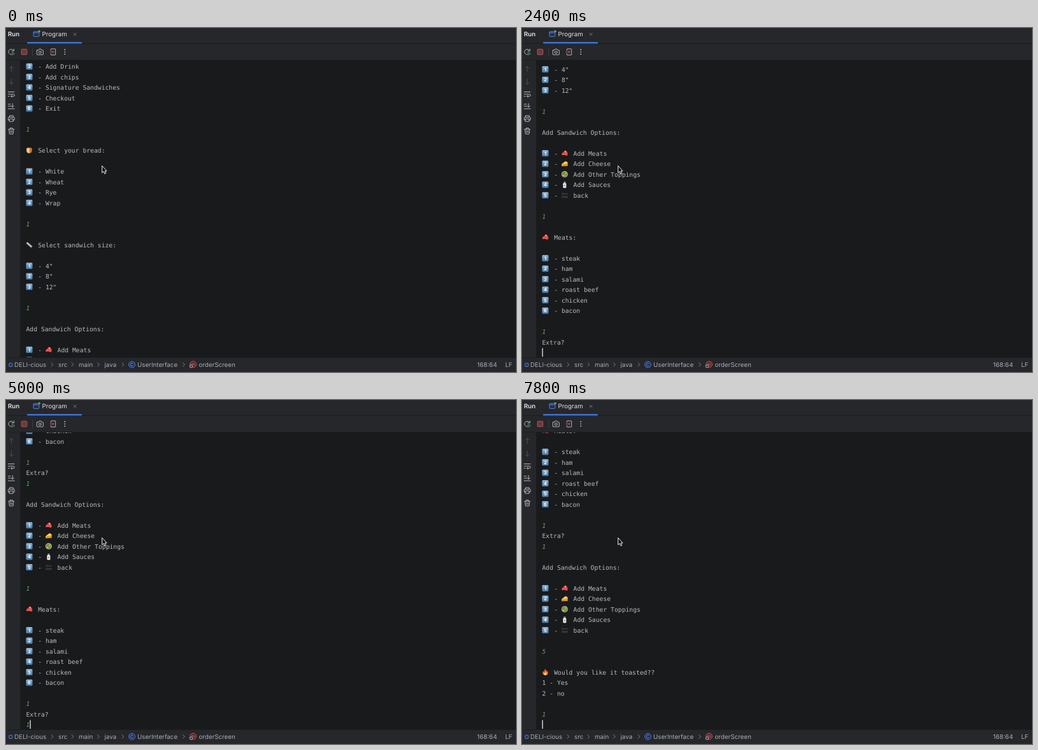
An HTML page that plays this animation: 800 by 541 pixels, repeating every 8 s.

```html
<!DOCTYPE html>
<html lang="en">
<head>
<meta charset="utf-8">
<title>Run console</title>
<style>
  html, body { margin: 0; width: 100%; height: 100%; overflow: hidden; background: #191a1c; }
  svg { display: block; }
  text { white-space: pre; text-rendering: geometricPrecision; }
  .ui { font: 9.75px Inter, sans-serif; fill: #a9acb3; }
  .mono { font: 9.72px "DejaVu Sans Mono", monospace; fill: #b9bbc0; }
  .input { font-style: italic; fill: #55a95b; }
  .digit { font: 700 7.5px Inter, sans-serif; fill: #fff; text-anchor: middle; }
  .line { fill: none; stroke: #c6c8ce; stroke-width: .9; stroke-linecap: round; stroke-linejoin: round; }
  .dim { stroke: #53565b; }
</style>
</head>
<body>
<svg width="800" height="541" viewBox="0 0 800 541">
  <defs>
    <clipPath id="console"><rect x="23" y="51" width="777" height="467"/></clipPath>
    <linearGradient id="blue" x2="0" y2="1">
      <stop stop-color="#8fb6d6"/><stop offset="1" stop-color="#4179a8"/>
    </linearGradient>
    <linearGradient id="flame" x2="0" y2="1">
      <stop stop-color="#e2472c"/><stop offset="1" stop-color="#f59a32"/>
    </linearGradient>
    <rect id="keycap" x="-5" y="-5" width="10" height="10" rx="1.6" fill="url(#blue)"/>
    <g id="bread">
      <path d="M-4.5-2.5Q-4-4.8-1-4.5L3-4Q5-3.5 4.3-1.2L3.8 3 0 4.7-3.7 3Z" fill="#c87d32"/>
      <path d="M-4.5-2.5Q-2-4.5.6-2.4L0 4.7-3.7 3Z" fill="#f2c987"/>
    </g>
    <g id="ruler">
      <path d="M-5-2.6-2.7-4.6 5 2.4 2.8 4.6Z" fill="#b9c0c5"/>
      <path d="M-2-3.6-3-2.6M0-1.8-1-.8M2 0 1 1M4 1.8 3 2.8" stroke="#747b80" stroke-width=".6"/>
    </g>
    <g id="meat">
      <path d="M-4.7 1Q-4-1-1.5-2.5 0-5 2-4.2 5-2 5 1 5 4.4 2.5 3.8-1 2-3.5 3.2-5.5 3-4.7 1Z" fill="#d93a36"/>
      <path d="M-3.8 1.4Q-1 0 2.8 2.4M0-2Q2.4-1.4 3.6 1" fill="none" stroke="#f0a09a" stroke-width=".8"/>
      <circle cx="1.3" cy="-2.6" r=".9" fill="#f5d5c8"/>
    </g>
    <g id="cheese">
      <path d="M-5 1 1-3.8Q4-4 4.8-.5V3.5L-4.6 4Z" fill="#e9a326"/>
      <path d="M-5 1 1-3.8Q4-4 4.8-.5Z" fill="#fbcf55"/>
      <circle cx="-1.5" cy="2.3" r=".9" fill="#c47d18"/><circle cx="2.6" cy="1.6" r=".8" fill="#c47d18"/>
    </g>
    <g id="salad">
      <circle r="5" fill="#c3c7b4"/><circle r="4.2" fill="#4f9a3c"/>
      <circle cx="-1.6" cy="-1.4" r="1.5" fill="#e0543a"/><circle cx="1.8" cy="1.4" r="1.4" fill="#e8733b"/>
      <circle cx="1.6" cy="-1.8" r="1.2" fill="#a4d463"/><circle cx="-1.5" cy="1.8" r="1.1" fill="#d9e0a0"/>
    </g>
    <g id="bottle">
      <path d="M-1.5-4.8H1.5V-2.4H-1.5Z" fill="#9fa3a7"/>
      <rect x="-2.5" y="-2.5" width="5" height="7.5" rx="1.2" fill="#eceded"/>
      <path d="M-.9 0H.9V2.5H-.9Z" fill="#8b8f94"/>
    </g>
    <g id="back" fill="#3b3d41">
      <path d="M-5-2.2-2.5-4.4V-3H5V-1.4H-2.5V0Z"/>
      <path d="M-4.5 1H-2.6V4.2H-4.5ZM-2 1H-.2V4.2H-2ZM.4 1H2.2V4.2H.4ZM2.8 1H4.7V4.2H2.8Z"/>
    </g>
    <g id="fire">
      <path d="M-.8-5Q2.2-3.5 2.3-1 3-1.6 3-2.6 5 .2 4 2.8 2.8 5 0 5-3 5-4 2.6-4.7 0-2.8-2-2.6-.6-1.8-.4-1-2.5-.8-5Z" fill="url(#flame)"/>
      <path d="M.2-.3Q2.4 1.8 1.8 3.4 1 4.8-.2 4.6-2 4.3-1.8 2.5-.2 2 .2-.3Z" fill="#fcd661"/>
    </g>
    <path id="chevron" class="line" d="M-1.5-2.8 1.4 0-1.5 2.8" style="stroke:#858890"/>
  </defs>

  <rect width="800" height="541" fill="#191a1c"/>
  <g clip-path="url(#console)">
    <g id="log"></g>
    <rect id="caret" width="1.5" height="13.5" fill="#ced0d6"/>
  </g>

  <!-- panels -->
  <path d="M0 0H800V51H0ZM0 51H22.5V518H0ZM0 518H800V541H0Z" fill="#25272a"/>
  <path d="M0 24.5H800M0 50.5H800M22.5 51V518M0 518.5H800" stroke="#1b1c1e" fill="none"/>

  <!-- tab strip -->
  <text class="ui" x="3" y="13" style="font-weight:600;fill:#e3e5e9">Run</text>
  <text class="ui" x="56.5" y="13" style="fill:#dfe1e5">Program</text>
  <rect x="33" y="22" width="86" height="2.4" rx="1" fill="#3574f0"/>
  <rect x="43" y="5.5" width="9" height="8" rx="1.3" fill="#25324d" stroke="#548af7" stroke-width=".9"/>
  <path d="M43 7.5H52" stroke="#548af7" stroke-width=".9"/>
  <circle cx="52" cy="5.3" r="2.1" fill="#58b25f" stroke="#25272a" stroke-width=".6"/>
  <path class="line" d="M106 7.8 110.2 12M110.2 7.8 106 12" style="stroke:#74777d"/>

  <!-- toolbar -->
  <path class="line" d="M11.6 35.3A4.2 4.2 0 1 0 8 41.8M12.4 33V36H9.3"/>
  <path d="M9.3 37.8 13.8 40.3 9.3 42.8Z" fill="#294a2e" stroke="#57965c" stroke-width=".8"/>
  <rect x="24.2" y="33.3" width="8.6" height="8.6" rx="1.2" fill="#673b3d" stroke="#cc565a" stroke-width=".9"/>
  <path d="M41.5 31V44" stroke="#393b40"/>
  <g class="line">
    <path d="M49 34.8H51L52 33H54.8L55.8 34.8H57.8Q58.4 34.8 58.4 35.5V41.2Q58.4 42 57.7 42H49Q48.3 42 48.3 41.2V35.5Q48.3 34.8 49 34.8Z"/>
    <circle cx="53.3" cy="38.1" r="1.9"/>
    <path d="M70.3 35.3V33.5Q70.3 32.8 71 32.8H77Q77.7 32.8 77.7 33.5V41.7Q77.7 42.4 77 42.4H71Q70.3 42.4 70.3 41.7V40"/>
    <path d="M69 37.6H75M73 35.6 75 37.6 73 39.6" style="stroke:#db5c5c"/>
  </g>
  <g fill="#c6c8ce"><circle cx="92.3" cy="34" r=".9"/><circle cx="92.3" cy="37.6" r=".9"/><circle cx="92.3" cy="41.2" r=".9"/></g>

  <!-- side buttons -->
  <path class="line dim" d="M8.3 68.5V60.3M5.2 63.3 8.3 60.2 11.4 63.3M8.3 80.3V88.5M5.2 85.5 8.3 88.6 11.4 85.5"/>
  <g class="line">
    <path d="M3.3 100.5H13M3.3 104H11.3Q13.4 104 13.4 105.7T11.3 107.4H8M9.5 105.8 7.8 107.4 9.5 109M3.3 107.4H5.3"/>
    <path d="M3.3 119.8H7M3.3 123H7M3.3 127H13.2M10.2 118.7V124.5M8 122.4 10.2 124.6 12.4 122.4"/>
    <path d="M5.5 140.3V137.8H11.2V140.3M5.5 144.8H4Q3.4 144.8 3.4 144V141.2Q3.4 140.3 4.2 140.3H12.5Q13.3 140.3 13.3 141.2V144Q13.3 144.8 12.6 144.8H11.2M5.5 143H11.2V147H5.5Z"/>
    <path d="M3.8 159.2H12.8M6.5 159V157.3H10.1V159M4.8 159.4 5.3 166Q5.3 166.8 6.1 166.8H10.5Q11.3 166.8 11.3 166L11.8 159.4M7.2 161.5V164.5M9.4 161.5V164.5"/>
  </g>

  <!-- status bar -->
  <rect x="4.8" y="527.2" width="5.2" height="5.2" rx="1" fill="#25324d" stroke="#548af7" stroke-width=".9"/>
  <circle cx="197.5" cy="529.3" r="4.9" fill="#25324d" stroke="#548af7" stroke-width=".9"/>
  <path d="M199.3 527.8A2.3 2.3 0 1 0 199.3 530.8" fill="none" stroke="#548af7"/>
  <circle cx="293.5" cy="529" r="4.9" fill="#4b2b2d" stroke="#db5c5c" stroke-width=".9"/>
  <path d="M291.5 531V527.6M291.5 528.4Q293.5 526.6 293.5 528.6V531M293.5 528.4Q295.6 526.6 295.6 528.6V531" fill="none" stroke="#db5c5c" stroke-width=".8"/>
  <circle cx="290.3" cy="532" r="2.1" fill="#25272a" stroke="#ced0d6" stroke-width=".9"/>
  <g id="status"></g>

  <path d="M151 217V228L153.5 225.8 155.2 229.6 157 228.8 155.4 225.2H158.4Z" transform="translate(-.3 -.3)" fill="#08090a" stroke="#f4f4f4" stroke-width="1" stroke-linejoin="round"/>
</svg>
<script>
const LEFT = 31.5, ROW = 16.5, BOTTOM = 510.5, CHAR = 5.85, ICON = 12.85, LOOP = 8000, TICK = 200;
const log = document.getElementById('log');
const caret = document.getElementById('caret');

function add(parent, tag, attrs, content = '') {
  const el = document.createElementNS('http://www.w3.org/2000/svg', tag);
  for (const key in attrs) el.setAttribute(key, attrs[key]);
  el.textContent = content;
  return parent.appendChild(el);
}

// Rows: {name} is an icon, {digit} a keycap, a leading > marks user input.
const menu = (...items) => items.map((item, i) => `{${i + 1}} - ${item}`);
const options = ['', 'Add Sandwich Options:', '',
  ...menu('{meat} Add Meats', '{cheese} Add Cheese', '{salad} Add Other Toppings', '{bottle} Add Sauces', '{back} back'), ''];
const meats = ['', '{meat} Meats:', '',
  ...menu('steak', 'ham', 'salami', 'roast beef', 'chicken', 'bacon'), ''];
const addMeat = [...options, '>1', ...meats, '>1', 'Extra?', '>1'];
const rows = [
  ...menu('Add Sandwich', 'Add Drink', 'Add chips', 'Signature Sandwiches', 'Checkout', 'Exit').slice(1), '', '>1',
  '', '{bread} Select your bread:', '', ...menu('White', 'Wheat', 'Rye', 'Wrap'), '', '>1',
  '', '{ruler} Select sandwich size:', '', ...menu('4"', '8"', '12"'), '', '>1',
  ...addMeat, ...addMeat, ...options, '>5',
  '', '{fire} Would you like it toasted??', '1 - Yes', '2 - no', '', '>1',
];

// Each step: time, row of the caret, whether its answer is typed, scroll still to go.
const steps = [
  [0, 33, 0, 94.5], [200, 33, 0, 0], [600, 33, 1, 0],
  [800, 44, 0, 110], [1000, 44, 0, 0], [1800, 44, 1, 0],
  [2200, 46, 0, 0], [2600, 46, 1, 0],
  [2800, 56, 0, 90], [3000, 56, 0, 0], [3200, 56, 1, 0],
  [3400, 67, 0, 130], [3600, 67, 0, 0], [4000, 67, 1, 0],
  [4400, 69, 0, 0], [4800, 69, 1, 0],
  [5400, 79, 0, 90], [5600, 79, 0, 0], [6600, 79, 1, 0],
  [7000, 85, 0, 60], [7200, 85, 0, 0], [7600, 85, 1, 0],
  [7800, 86, 0, 0],
];

function buildRow(row, index) {
  const group = add(log, 'g', { transform: `translate(0 ${index * ROW})` });
  const isInput = row[0] === '>';
  let x = LEFT;
  for (const part of row.replace('>', '').split(/(\{\w+\})/).filter(Boolean)) {
    if (part[0] === '{') {
      const name = part.slice(1, -1), digit = /\d/.test(name);
      add(group, 'use', { href: digit ? '#keycap' : '#' + name, x: x + 5, y: 0 });
      if (digit) add(group, 'text', { class: 'digit', x: x + 5, y: 2.7 }, name);
      x += ICON;
    } else {
      const indent = part.length - part.trimStart().length;
      add(group, 'text', { class: isInput ? 'mono input' : 'mono', x: x + indent * CHAR, y: 3.5 }, part.trim());
      x += part.length * CHAR;
    }
  }
  return group;
}
const rowGroups = rows.map(buildRow);

const status = document.getElementById('status');
[['DELI-cious', 13], ['src', 82], ['main', 114], ['java', 154.5], ['UserInterface', 206],
 ['orderScreen', 302.5], ['168:64', 739], ['LF', 783]]
  .forEach(([label, x]) => add(status, 'text', { class: 'ui', x, y: 532.7 }, label));
[72.5, 104.5, 145, 183.5, 279].forEach(x => add(status, 'use', { href: '#chevron', x, y: 529.3 }));

function draw(now) {
  const time = Math.floor(now % LOOP / TICK) * TICK;
  const [since, current, typed, lag] = steps.findLast(step => step[0] <= time);
  log.setAttribute('transform', `translate(0 ${BOTTOM - current * ROW + lag})`);
  rowGroups.forEach((group, i) => {
    group.style.display = i < current + typed ? '' : 'none';
  });
  caret.setAttribute('x', LEFT + typed * CHAR);
  caret.setAttribute('y', BOTTOM + lag - 7);
  caret.style.display = Math.floor((time - since) / 500) % 2 ? 'none' : '';
  requestAnimationFrame(frame);
}

const start = performance.now();
function frame() { draw(performance.now() - start); }
frame();
</script>
</body>
</html>
```
